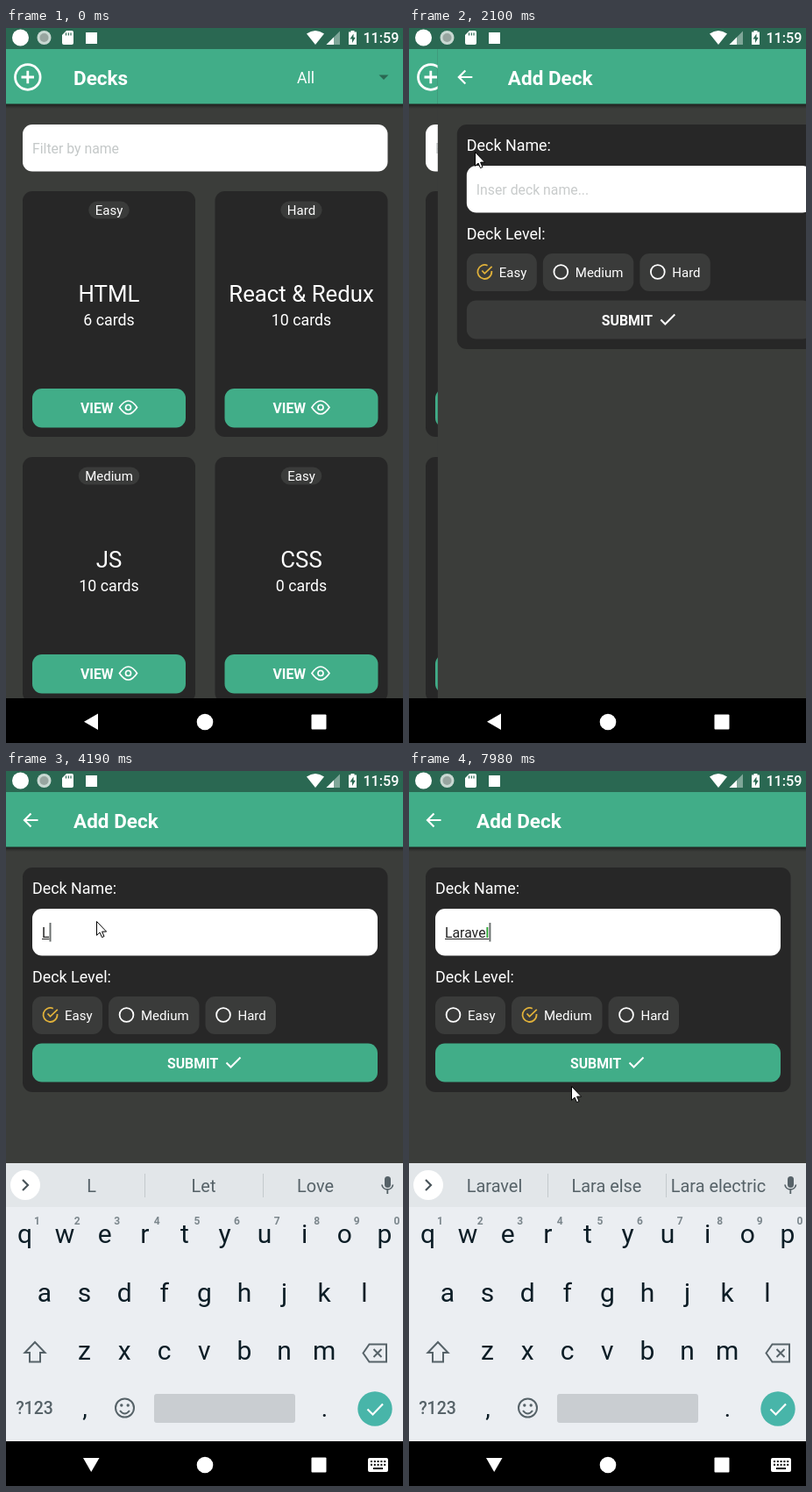
An HTML page with a canvas for the animation above (8 s loop, 453x815 px).

```html
<!DOCTYPE html>
<html lang="en">
<meta charset="utf-8">
<title>Decks app</title>
<style>
  html, body { margin: 0; width: 100%; height: 100%; overflow: hidden; background: #000; }
  canvas { display: block; }
</style>
<canvas id="stage" width="453" height="815"></canvas>
<script>
const ctx = document.getElementById('stage').getContext('2d');
const LOOP = 8000, STEP = 77.25;
const GREEN = '#41ad88', BG = '#3b3d3a', CARD = '#272727', CHIP = '#3a3b3a', INK = '#0c1d26', GREY = '#566268';
let now = 0;
const since = ms => now > ms - 20;

function text(str, x, y, size, color = '#fff', align = 'left', weight = 400) {
  ctx.font = `${weight} ${size}px Roboto, sans-serif`;
  ctx.textAlign = align;
  ctx.fillStyle = color;
  ctx.fillText(str, x, y);
}
function box(x, y, w, h, r, color) {
  ctx.fillStyle = color;
  ctx.beginPath();
  ctx.roundRect(x, y, w, h, r);
  ctx.fill();
}
const disc = (x, y, r, color) => box(x - r, y - r, 2 * r, 2 * r, r, color);
function fill(d, color) {
  ctx.fillStyle = color;
  ctx.fill(new Path2D(d));
}
function line(d, color, width) {
  ctx.strokeStyle = color;
  ctx.lineWidth = width;
  ctx.stroke(new Path2D(d));
}
function at(x, y, draw) {
  ctx.save();
  ctx.translate(x, y);
  draw();
  ctx.restore();
}
function ring(x, y, r, color, width) {
  ctx.strokeStyle = color;
  ctx.lineWidth = width;
  ctx.beginPath();
  ctx.arc(x, y, r, 0, 7);
  ctx.stroke();
}

function statusBar() {
  box(0, 0, 453, 24, 0, '#2a6852');
  disc(16.5, 11, 9.5, '#fff');
  disc(43.5, 11, 8, '#c9d8d2');
  disc(43.5, 11, 5, '#98a5a0');
  fill('M69 3H75Q77 3 77 5V17Q77 19 75 19H66Q64 19 64 17V8Z', '#fff');
  line('M68.5 5.5V8.5M71.3 5.5V8.5M74 5.5V8.5', '#2a6852', 1.2);
  box(91, 5, 13, 13, 0, '#fff');
  fill('M343 6.5Q353 -.5 363 6.5L353 19Z', '#fff');
  fill('M381 3.5V19H365.5Z', '#7fa698');
  fill('M374 10.5V19H365.5Z', '#fff');
  fill('M393.5 3H397.5V4.5H400V19H391V4.5H393.5Z', '#fff');
  fill('M396.5 6.5L392.5 12.5H395V17L398.8 10.8H396.5Z', '#2a6852');
  text('11:59', 448.5, 17, 16.2, '#fff', 'right', 500);
}

function page(title) {
  box(-3, 24, 456, 740, 0, BG);
  const shade = ctx.createLinearGradient(0, 86, 0, 92);
  shade.addColorStop(0, '#0008');
  shade.addColorStop(1, '#0000');
  box(-3, 86, 456, 6, 0, shade);
  box(-3, 24, 456, 62.5, 0, GREEN);
  text(title, 77, 64.5, 22.5, '#fff', 'left', 700);
}

function deck(x, y, level, name, cards) {
  at(x, y, () => {
    box(0, 0, 197, 280, 11, CARD);
    ctx.font = '15px Roboto, sans-serif';
    const w = ctx.measureText(level).width + 15;
    box(98.5 - w / 2, 11.5, w, 20, 10, CHIP);
    text(level, 98.5, 27, 15, '#fff', 'center');
    text(name, 98.5, 126, 25.8, '#fff', 'center');
    text(cards + ' cards', 98.5, 152.5, 17.8, '#fff', 'center');
    box(11, 225, 175, 44.5, 11, GREEN);
    text('VIEW', 66, 253, 15.8, '#fff', 'left', 700);
    line('M110.5 246.5Q120.5 231.5 130.5 246.5Q120.5 261.5 110.5 246.5Z', '#fff', 1.7);
    ring(120.5, 246.5, 3, '#fff', 1.7);
  });
}

function decksPage() {
  page('Decks');
  ring(24.8, 56, 14.3, '#fff', 2.8);
  line('M17.5 56H32M24.8 48.8V63.2', '#fff', 2.8);
  text('All', 332, 63, 17.7);
  fill('M425.5 53.5H436.5L431 59Z', '#2a6852');
  box(19, 110, 416.5, 53.5, 11, '#fff');
  text('Filter by name', 30, 143, 15.8, '#c4c8c8');
  deck(19, 186, 'Easy', 'HTML', 6);
  deck(238.5, 186, 'Hard', 'React & Redux', 10);
  deck(19, 489, 'Medium', 'JS', 10);
  deck(238.5, 489, 'Easy', 'CSS', 0);
}

// [time, typed text, suggestions]
const typing = [
  [0, '', 'I', 'The', "I'm"],
  [4110, 'L', 'L', 'Let', 'Love'],
  [4720, 'La', 'La', 'Last', 'Late'],
  [4870, 'Lar', 'Lar', 'Large', 'Lar'],
  [5030, 'Lara', 'Lara', 'Large', 'Later'],
  [5350, 'Larav', 'Larav', 'Lara v', 'Lara via'],
  [5580, 'Larave', 'Larave', 'Lara be', 'Lara ever'],
  [5660, 'Laravel', 'Laravel', 'Lara else', 'Lara electric'],
];
const typed = () => typing.findLast(entry => since(entry[0]));
const blinks = [[2790, 3340], [3800, 6190], [6710, 7210], [7720, 9000]];

function radio(x, w, label, chosen) {
  box(x, 257, w, 43, 11, CHIP);
  at(x + 20.5, 278, () => {
    if (chosen) line('M8 -1V0A8 8 0 1 1 3.3 -7.3M-3 -1.5L0 1.8L8.3 -6.2', '#e0b13a', 1.8);
    else ring(0, 0, 7.9, '#fff', 1.8);
  });
  text(label, x + 37, 284, 15);
}

function addPage() {
  const word = typed()[1];
  page('Add Deck');
  line('M36.5 56H21.5M28.5 48.5L21 56L28.5 63.5', '#fff', 2.2);
  box(19, 110, 416.5, 256, 11, CARD);
  text('Deck Name:', 30, 140, 17.9);
  box(30, 157, 394, 53.5, 11, '#fff');
  text(word || 'Inser deck name...', 41, 190, 15.8, word ? '#222' : '#c8cbcb');
  const end = 41 + (word ? ctx.measureText(word).width : 0);
  if (word) box(41, 191, end - 41, 1, 0, '#222');
  if (word === 'Laravel') text('l', end, 190, 15.8, '#22b52c', 'right');
  if (blinks.some(([on, off]) => since(on) && !since(off)))
    box(end, 173, 2, 21.5, 0, since(5660) && !since(6190) ? '#12c832' : '#6b706f');

  text('Deck Level:', 30, 241, 17.9);
  const medium = since(7440);
  radio(30, 80, 'Easy', !medium);
  ctx.globalAlpha = since(7210) && !medium ? 0.35 : 1;
  radio(117, 103.5, 'Medium', medium);
  ctx.globalAlpha = 1;
  radio(227.5, 80.5, 'Hard', false);
  box(30, 310.5, 394, 44, 11, word ? GREEN : CHIP);
  text('SUBMIT', 184, 339, 15.8, '#fff', 'left', 700);
  line('M251.5 332.5L256.5 337.5L267.5 326.5', '#fff', 2);
}

function keyboard() {
  const [, word, ...hints] = typed();
  const pitch = 45.6;
  const row = (keys, x, y) => [...keys].forEach((key, i) =>
    text(word ? key : key.toUpperCase(), x + i * pitch, y, 30, INK, 'center'));

  box(0, 447, 453, 317, 0, '#ebeef2');
  box(0, 447, 453, 50, 0, '#e2e6e9');
  disc(22, 472, 17, '#fff');
  line('M19 466L25 472L19 478', '#4a555b', 2.2);
  hints.forEach((hint, i) => text(hint, [97.5, 225.5, 353][i], 480, 19.9, GREY, 'center'));
  box(158, 459, 1, 27, 0, '#c4cacd');
  box(293, 459, 1, 27, 0, '#c4cacd');
  box(432, 462, 7, 13, 3.5, GREY);
  line('M429 471.5A6.3 6.3 0 0 0 441.5 471.5M435.3 478V482', GREY, 1.8);

  row('qwertyuiop', 21.5, 538);
  [...'1234567890'].forEach((n, i) => text(n, 35.5 + i * pitch, 517, 12, '#7b868c', 'center', 700));
  row('asdfghjkl', 44, 605);
  row('zxcvbnm', 89.5, 671);

  const shift = 'M33 651L44.5 663H39V673.5H27V663H21.5Z';
  if (!word) fill(shift, GREY);
  line(shift, GREY, 2);
  line('M407.5 663.5L414.5 653.5H434V673.5H414.5ZM419.5 659L428.5 668M428.5 659L419.5 668', GREY, 2);

  text('?123', 32.5, 733, 19.5, GREY, 'center', 500);
  text(',', 90, 736, 28, INK, 'center');
  text('.', 363.5, 736, 28, INK, 'center');
  ring(135.5, 726, 10.5, GREY, 2);
  disc(131.8, 723, 1.7, GREY);
  disc(139.2, 723, 1.7, GREY);
  line('M130 729Q135.5 736 141 729', GREY, 2);
  box(169, 710, 161, 33, 3, '#c9cdd1');
  disc(421, 727, 19.7, '#48b5a9');
  line('M412.5 727.5L418.5 733.5L430 721.5', '#fff', 2.2);
}

function navBar(typingMode) {
  box(0, 764, 453, 51, 0, '#000');
  fill(typingMode ? 'M88 783H106.5L97.2 799Z' : 'M89 790.7L105 781.5V800Z', '#fff');
  disc(227, 791, 9.3, '#fff');
  box(348.5, 782.5, 17, 17, 1, '#fff');
  if (!typingMode) return;
  box(413, 783, 23, 16, 2, '#fff');
  for (let i = 0; i < 10; i++)
    box(416 + (i % 5) * 3.8, 786 + Math.floor(i / 5) * 3.8, 2, 2, 0, '#000');
  box(419, 794, 11, 2, 0, '#000');
}

// [time, x, y] of the arrow tip
const route = [
  [250, 360, 755], [710, 35, 45], [865, 35, 45], [1255, 31, 52], [1873, 31, 52],
  [2104, 75, 141], [2560, 103, 171], [6121, 103, 171], [6816, 150, 280],
  [7357, 150, 280], [7975, 185, 359],
];
function pointer() {
  if (!since(250)) return;
  const i = Math.max(0, route.findLastIndex(p => now >= p[0]));
  const a = route[i], b = route[i + 1] || a;
  const u = b === a ? 0 : Math.max(0, (now - a[0]) / (b[0] - a[0]));
  const ease = 1 - (1 - u) ** 2;
  at(a[1] + (b[1] - a[1]) * ease, a[2] + (b[2] - a[2]) * ease, () => {
    const arrow = 'M.5 .5V16.3L4 13L6.5 18.6L9 17.5L6.6 12.1H11.6Z';
    fill(arrow, '#fff');
    line(arrow, '#000', 1);
  });
}

function frame(time) {
  const t = time % LOOP;
  now = 250 + Math.floor((t - 246) / STEP) * STEP;
  if (since(1950)) {
    const u = Math.min(1, (now - 1905) / 500);
    const x = 453 * (1 - u) ** 5;
    if (u < 1) decksPage();
    at(x, 0, addPage);
  } else decksPage();
  if (since(3570)) at(0, since(3650) ? 0 : 120, keyboard);
  statusBar();
  navBar(since(3340));
  pointer();
  requestAnimationFrame(frame);
}
requestAnimationFrame(frame);
</script>
</html>
```
